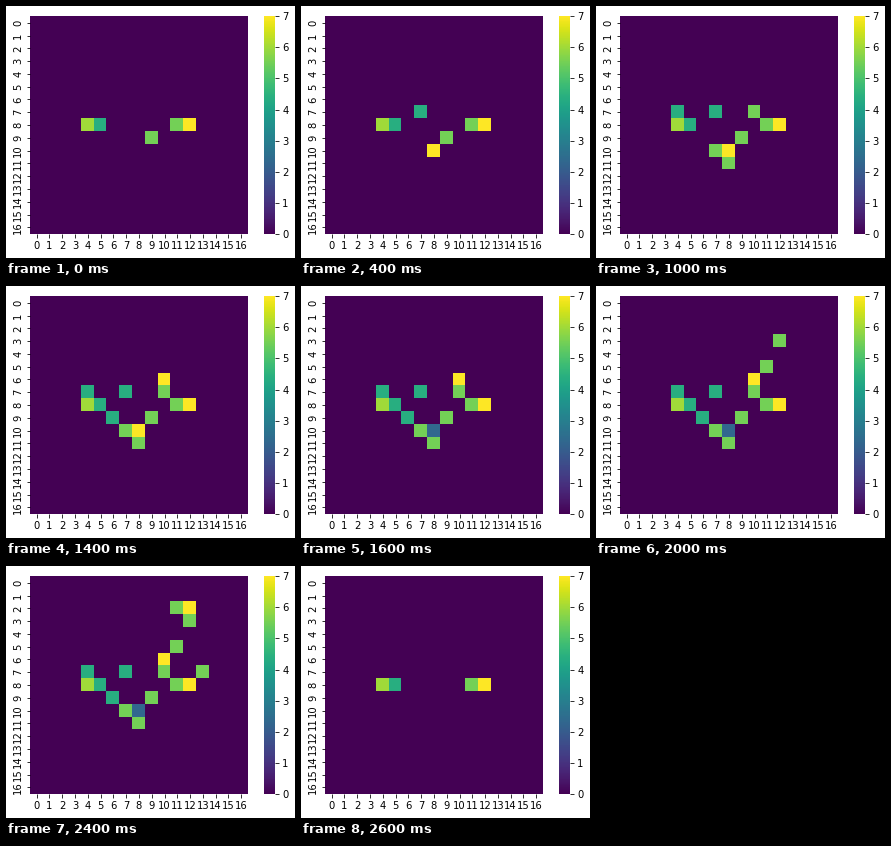
Write a matplotlib script that moves like this. It is 289 by 252 pixels and loops after 2800 ms.

```python
import matplotlib.pyplot as plt
import numpy as np
from matplotlib.animation import FuncAnimation
from matplotlib.transforms import Affine2D

W, H, DPI = 289, 252, 72
N = 17
STEPS, STEP_MS = 14, 200
LEFT, TOP, SIDE = 24.2, 10.35, 217.44
BAR_GAP, BAR_W = 16.74, SIDE / 20

BLUE, TEAL, GREEN, LIME, YELLOW = 2.33, 4.4, 5.5, 6, 7

# (step, row, column, value): each cell keeps its value until the reset
EVENTS = [
    (0, 8, 4, LIME), (0, 8, 5, TEAL), (0, 8, 11, GREEN), (0, 8, 12, YELLOW),
    (0, 9, 9, GREEN),
    (1, 10, 8, YELLOW),
    (2, 7, 7, TEAL),
    (3, 11, 8, GREEN),
    (4, 7, 10, GREEN),
    (5, 7, 4, TEAL), (5, 10, 7, GREEN),
    (6, 6, 10, YELLOW),
    (7, 9, 6, TEAL),
    (8, 10, 8, BLUE),
    (9, 5, 11, GREEN),
    (10, 3, 12, GREEN),
    (11, 2, 12, YELLOW), (11, 7, 13, GREEN),
    (12, 2, 11, GREEN),
]
START_CELLS = 4


def grid_at(step):
    grid = np.zeros((N, N))
    if step == STEPS - 1:
        active = EVENTS[:START_CELLS]
    else:
        active = [e for e in EVENTS if e[0] <= step]
    for _, row, col, value in active:
        grid[row, col] = value
    return grid


def add_axes(left, width):
    """Axes placed by pixel, sharing the top and height of the grid."""
    return fig.add_axes([left / W, 1 - (TOP + SIDE) / H, width / W, SIDE / H])


plt.rcParams.update({"font.family": "DejaVu Sans", "font.size": 10})
fig = plt.figure(figsize=(W / DPI, H / DPI), dpi=DPI, facecolor="white")

ax = add_axes(LEFT, SIDE)
# Half a pixel up and left, with 1 px edges, so cells snap to whole pixels
snap = ax.transData + Affine2D().translate(-0.5, 0.5)
mesh = ax.pcolormesh(grid_at(0), cmap="viridis", vmin=0, vmax=7,
                     edgecolors="face", linewidth=1, clip_on=False,
                     transform=snap)
ax.set(xlim=(0, N), ylim=(N, 0))
centers = np.arange(N) + 0.5
ax.set_xticks(centers, range(N))
ax.set_yticks(centers, range(N), rotation=90, va="center")
ax.spines[:].set_visible(False)

bar_ax = add_axes(LEFT + SIDE + BAR_GAP, BAR_W)
bar = fig.colorbar(mesh, cax=bar_ax, ticks=range(8))
bar.outline.set_linewidth(0)


def update(step):
    mesh.set_array(grid_at(step))
    return [mesh]


anim = FuncAnimation(fig, update, frames=STEPS, interval=STEP_MS,
                     repeat=True, repeat_delay=0)
plt.show()
```
